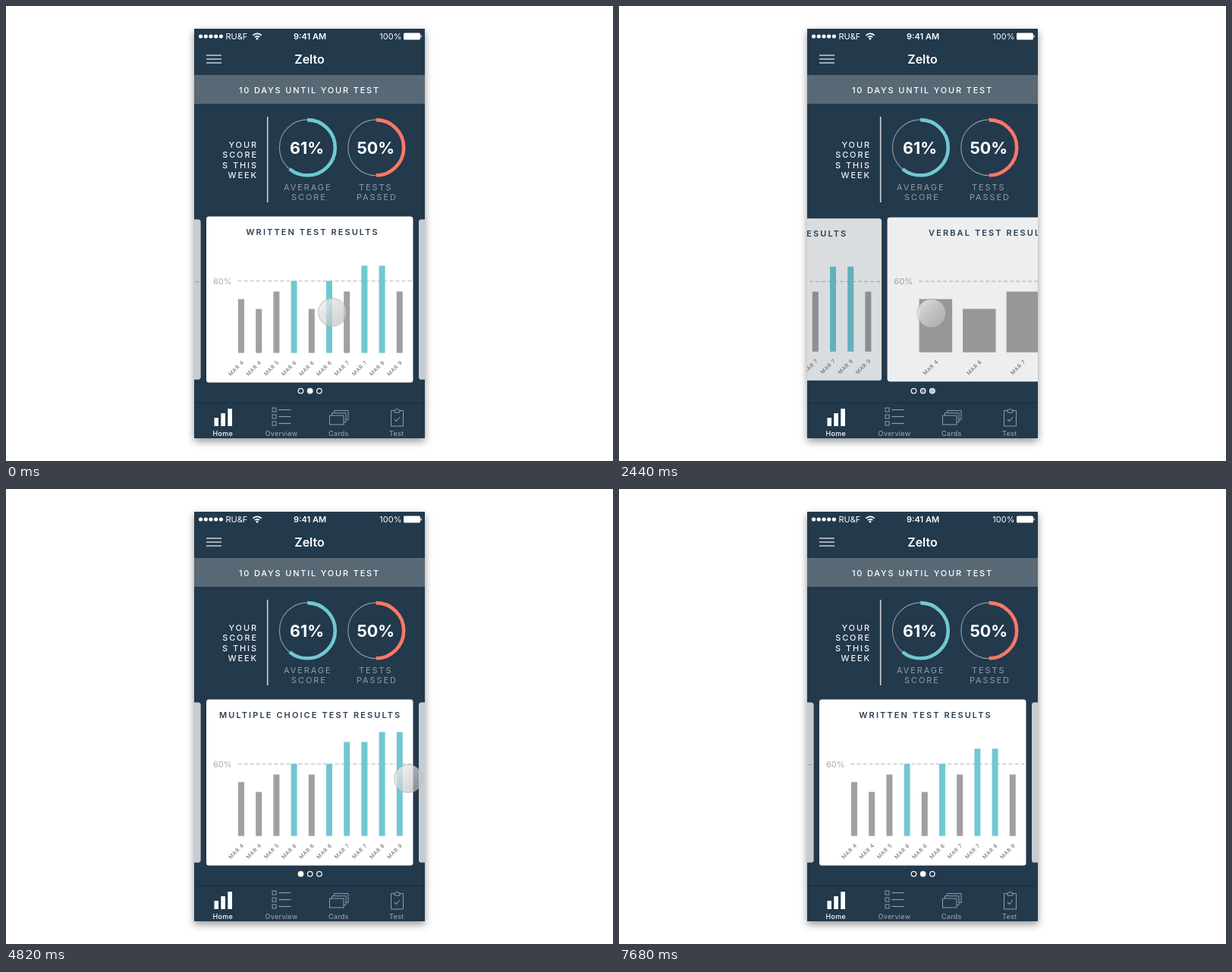
Write an HTML page with a canvas that moves like this. It is 800 px wide and 600 px high and loops after 7720 ms.

```html
<!DOCTYPE html>
<html lang="en">
<head>
<meta charset="utf-8">
<title>Test results carousel</title>
<style>
  html, body { margin: 0; width: 100%; height: 100%; overflow: hidden; background: #fff; }
  canvas { display: block; width: 800px; height: 600px; }
</style>
</head>
<body>
<canvas id="stage" width="800" height="600"></canvas>
<script>
const ctx = document.getElementById('stage').getContext('2d');
const LOOP = 7720;
const NAVY = '#23394c', CYAN = '#71c8d2', CORAL = '#fb7767', GREY = '#a0a0a0', MUTED = '#929ca5';
const CARD = { x: 264, y: 277.5, w: 272.5, h: 219, pitch: 280 };
const MID = CARD.y + CARD.h / 2;
const PASS = 95;

const cards = [
  { title: 'MULTIPLE CHOICE TEST RESULTS', tx: 17, bar: 8, pitch: 23.2,
    days: '4456667789', values: [71, 58, 81, 95, 81, 95, 124, 124, 137, 137] },
  { title: 'WRITTEN TEST RESULTS', tx: 52.3, bar: 8, pitch: 23.2,
    days: '4456667789', values: [71, 58, 81, 95, 58, 95, 81, 115, 115, 81] },
  { title: 'VERBAL TEST RESULTS', tx: 54.5, bar: 43.5, pitch: 57.5,
    days: '4679', values: [71, 58, 81, 95] }
];

// Pointer path: time, x, y
const path = [
  [0, 430, 404], [620, 430, 404], [1100, 269, 421.5], [1550, 269, 421.5],
  [2200, 311, 400], [2250, 311, 400], [2580, 474, 408], [2850, 474, 408],
  [3420, 358, 391], [3620, 358, 391], [3980, 530, 382], [5440, 530, 382],
  [5800, 346, 403], [LOOP, 346, 403]
];

// Each swipe: press time, release time, settled time, page from, page to, slack before the card follows
const swipes = [
  [620, 1100, 1620, 1, 2, 23],
  [2250, 2580, 3140, 2, 1, 11],
  [3620, 3980, 4620, 1, 0, 11],
  [5440, 5800, 6400, 0, 1, 16]
];

const clamp = (v, a = 0, b = 1) => Math.min(b, Math.max(a, v));
const smooth = u => u * u * (3 - 2 * u);
const easeOut = u => 1 - Math.pow(1 - u, 3);

function pointer(t) {
  let i = 0;
  while (i < path.length - 2 && t >= path[i + 1][0]) i++;
  const [t0, x0, y0] = path[i], [t1, x1, y1] = path[i + 1];
  const u = smooth(clamp((t - t0) / (t1 - t0)));
  return { x: x0 + (x1 - x0) * u, y: y0 + (y1 - y0) * u };
}

function pageAt(t) {
  let page = 1;
  for (const [press, release, settled, from, to, slack] of swipes) {
    if (t < press) break;
    const moved = Math.abs(pointer(Math.min(t, release)).x - pointer(press).x);
    const drag = from + (to - from) * Math.max(0, moved - slack) / CARD.pitch;
    page = drag + (to - drag) * easeOut(clamp((t - release) / (settled - release)));
  }
  return page;
}

function text(str, x, y, size, weight, color, spacing = 0, align = 'left') {
  ctx.font = `${weight} ${size}px Inter, Roboto, sans-serif`;
  ctx.letterSpacing = spacing + 'px';
  ctx.textAlign = align;
  ctx.fillStyle = color;
  ctx.fillText(str, x, y);
}

function rect(x, y, w, h, color) {
  ctx.fillStyle = color;
  ctx.fillRect(x, y, w, h);
}

function line(points, color, width = 1, dash = []) {
  ctx.beginPath();
  points.forEach(([x, y], i) => i ? ctx.lineTo(x, y) : ctx.moveTo(x, y));
  ctx.setLineDash(dash);
  ctx.strokeStyle = color;
  ctx.lineWidth = width;
  ctx.stroke();
  ctx.setLineDash([]);
}

function box(x, y, w, h, color) {
  ctx.strokeStyle = color;
  ctx.lineWidth = 1;
  ctx.strokeRect(x, y, w, h);
}

function arc(x, y, r, from, to, color, width) {
  ctx.beginPath();
  ctx.arc(x, y, r, from, to);
  ctx.strokeStyle = color;
  ctx.lineWidth = width;
  ctx.stroke();
}

function disc(x, y, r, color) {
  ctx.beginPath();
  ctx.arc(x, y, r, 0, 7);
  ctx.fillStyle = color;
  ctx.fill();
}

function phone() {
  rect(0, 0, 800, 600, '#fff');
  ctx.save();
  ctx.shadowColor = 'rgba(0,0,0,.42)';
  ctx.shadowBlur = 10;
  ctx.shadowOffsetY = 4;
  rect(248, 30, 304, 540, NAVY);
  ctx.restore();
}

function header() {
  for (let i = 0; i < 5; i++) disc(256.6 + i * 6.7, 40, 2.6, '#fff');
  text('RU&F', 289.5, 44, 11, 400, '#fff');
  for (const r of [4.2, 7.6]) arc(331, 44, r, -Math.PI * .76, -Math.PI * .24, '#fff', 1.7);
  disc(331, 43, 1.5, '#fff');
  text('9:41 AM', 400.5, 44, 11, 600, '#fff', 0, 'center');
  text('100%', 521.5, 44, 11, 400, '#fff', 0, 'right');
  ctx.beginPath();
  ctx.roundRect(524, 35.5, 22, 9, 1.5);
  ctx.fill();
  rect(546.5, 38.5, 1.2, 3, '#fff');

  for (const y of [65, 70, 75]) line([[264, y], [284, y]], '#e4e8eb', 1.3);
  text('Zelto', 400, 76, 16, 600, '#fff', 0, 'center');
  rect(248, 91, 304, 38, '#586975');
  text('10 DAYS UNTIL YOUR TEST', 307, 114.7, 11, 500, '#fff', 1.8);
}

function ring(x, share, color, label, labelX) {
  const top = -Math.PI / 2;
  arc(x, 186.7, 36.8, 0, Math.PI * 2, '#8d979f', 1.2);
  arc(x, 186.7, 36.6, top, top + Math.PI * 2 * share, color, 4.6);
  text(label, labelX, 194.6, 21.5, 700, '#fff', 0, 'center');
}

function scores() {
  ['YOUR', 'SCORE', 'S THIS', 'WEEK'].forEach((s, i) =>
    text(s, 332, 187 + i * 13.3, 11, 500, '#f1f3f4', 1.9, 'right'));
  line([[344.7, 146], [344.7, 259]], '#cdd3d7', 1.6);
  ring(397.2, .61, CYAN, '61%', 396.5);
  ring(487.6, .5, CORAL, '50%', 487.3);
  text('AVERAGE', 366, 243, 11, 400, MUTED, 1.9);
  text('SCORE', 376, 256.3, 11, 400, MUTED, 1.9);
  text('TESTS', 465, 243, 11, 400, MUTED, 1.9);
  text('PASSED', 462, 256.3, 11, 400, MUTED, 1.9);
}

function chart({ title, tx, bar, pitch, days, values }, x) {
  text(title, x + tx, 302.3, 11, 600, '#2b3f52', 2.1);
  text('60%', x + 9, 366.5, 11, 400, '#a8a8a8');
  line([[x + 41.5, 362.7], [x + CARD.w, 362.7]], '#b4b4b4', 1, [5, 3]);
  values.forEach((h, i) => {
    const left = x + 42 + i * pitch;
    rect(left, 457.5 - h, bar, h, h >= PASS ? CYAN : GREY);
    ctx.save();
    ctx.translate(left + bar / 2 + 4, 470.5);
    ctx.rotate(-Math.PI / 4);
    text('MAR ' + days[i], 0, 0, 7, 400, '#626262', .6, 'right');
    ctx.restore();
  });
}

function carousel(page) {
  ctx.save();
  ctx.beginPath();
  ctx.rect(248, 265, 304, 240);
  ctx.clip();
  for (let i = -1; i <= 3; i++) {
    const away = Math.min(1, Math.abs(i - page));
    const x = CARD.x + CARD.pitch * (i - page);
    if (x > 552 || x + CARD.w < 248) continue;
    ctx.save();
    ctx.translate(0, MID);
    ctx.scale(1, 1 - .036 * away);
    ctx.translate(0, -MID);
    ctx.beginPath();
    ctx.roundRect(x, CARD.y, CARD.w, CARD.h, 3.5);
    ctx.fillStyle = '#fff';
    ctx.fill();
    ctx.clip();
    if (cards[i]) chart(cards[i], x);
    // dim towards the backdrop as the card leaves the middle
    ctx.globalAlpha = .255 * away;
    rect(x, CARD.y, CARD.w, CARD.h, NAVY);
    ctx.restore();
  }
  ctx.restore();

  for (let i = 0; i < 3; i++) {
    const x = 388.5 + i * 12.2;
    disc(x, 507.6, 3.4, `rgba(255,255,255,${clamp(1 - Math.abs(i - page))})`);
    arc(x, 507.6, 3.3, 0, Math.PI * 2, '#f2f4f5', 1.3);
  }
}

function tabs() {
  rect(248, 523, 304, 1, '#1b2d3d');
  rect(274.5, 543, 5.5, 11, '#fff');
  rect(283.3, 537, 5.7, 17, '#fff');
  rect(292.3, 531, 5.7, 23, '#fff');

  for (const y of [532.5, 541.5, 550.5]) {
    box(351, y - 2.5, 5, 5, MUTED);
    line([[359.5, y], [375.5, y]], MUTED, 1.2);
  }

  box(426.5, 540, 18.5, 12, MUTED);
  line([[429.5, 540], [429.5, 536.7], [448, 536.7], [448, 548.7], [445, 548.7]], MUTED);
  line([[432.5, 536.7], [432.5, 533.5], [451, 533.5], [451, 545.5], [448, 545.5]], MUTED);

  line([[512, 533.5], [507.5, 533.5], [507.5, 554], [523.5, 554], [523.5, 533.5], [519, 533.5]], MUTED);
  line([[512, 536], [512, 532.5], [514, 532.5], [515.5, 530.5], [517, 532.5], [519, 532.5], [519, 536], [512, 536]], MUTED);
  line([[512, 545], [514.5, 547.5], [519, 542]], MUTED, 1.1);

  text('Home', 285.8, 566.7, 9, 500, '#fff', .25, 'center');
  text('Overview', 363, 566.7, 9, 500, MUTED, .25, 'center');
  text('Cards', 438.3, 566.7, 9, 500, MUTED, .25, 'center');
  text('Test', 514.7, 566.7, 9, 500, MUTED, .25, 'center');
}

function touch(t) {
  const alpha = 1 - clamp((t - 6500) / 400);
  if (!alpha) return;
  const { x, y } = pointer(t);
  ctx.save();
  ctx.globalAlpha = alpha;
  const fill = ctx.createLinearGradient(x - 13, y - 13, x + 13, y + 13);
  fill.addColorStop(0, 'rgba(248,248,248,.72)');
  fill.addColorStop(1, 'rgba(205,205,205,.6)');
  ctx.shadowColor = 'rgba(0,0,0,.2)';
  ctx.shadowBlur = 3;
  disc(x, y, 18, fill);
  ctx.shadowColor = 'transparent';
  arc(x, y, 18.2, 0, Math.PI * 2, 'rgba(190,190,190,.75)', 1.2);
  ctx.restore();
}

function draw(t) {
  phone();
  header();
  scores();
  carousel(pageAt(t));
  tabs();
  touch(t);
}

const start = performance.now();
function tick(now) {
  draw(Math.max(0, now - start) % LOOP);
  requestAnimationFrame(tick);
}
draw(0);
requestAnimationFrame(tick);
</script>
</body>
</html>
```
